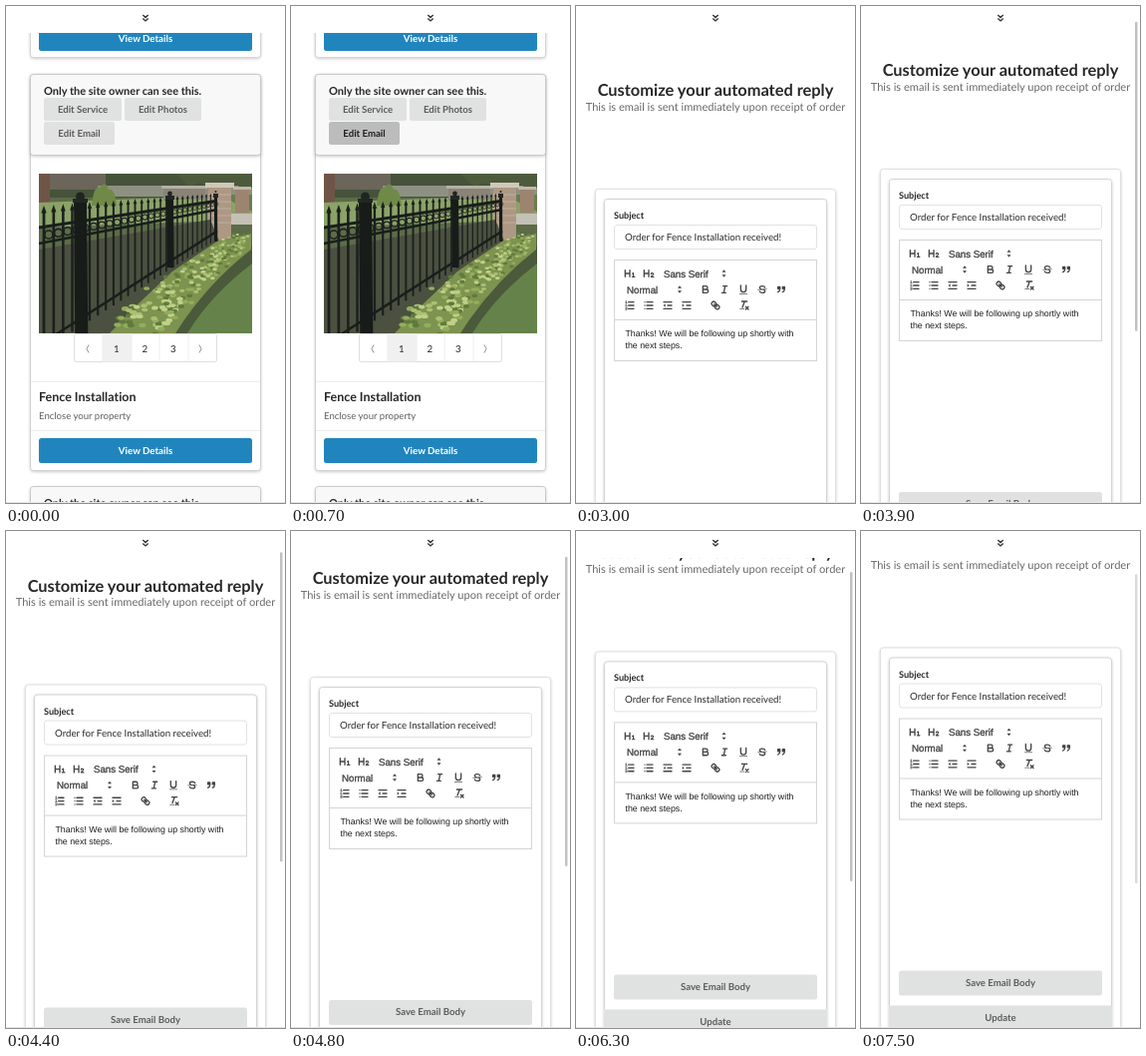
An HTML page for the animation above (8 s loop, 280 px wide and 498 px high).

```html
<!DOCTYPE html>
<html lang="en">
<head>
<meta charset="utf-8">
<title>Email editor walkthrough</title>
<style>
  html, body { margin: 0; height: 100%; overflow: hidden; background: #fff; }
  svg { display: block; width: 280px; height: 498px; }
  text {
    font-family: Lato, sans-serif; white-space: pre;
    text-rendering: geometricPrecision; font-variant-ligatures: none;
  }
  .b { font-weight: 700; }
  .m { text-anchor: middle; }
  .h { font-family: "Liberation Sans", Arial, sans-serif; }
  .pick { stroke: #444; stroke-width: .35; }
  .icon { fill: none; stroke: #444; stroke-width: 2; stroke-linecap: round; stroke-linejoin: round; }
  .icon .f { fill: #444; stroke: none; }
  .icon .t { stroke-width: 1; }
  .icon .n { stroke-width: 1.7; }
  .card { filter: drop-shadow(0 1px 1.5px #0003); }
</style>
</head>
<body>
<svg id="stage" viewBox="0 0 280 498"></svg>
<script>
const rect = (x, y, w, h, fill, r = 0, extra = '') =>
  `<rect x="${x}" y="${y}" width="${w}" height="${h}" rx="${r}" fill="${fill}" ${extra}/>`;
const box = (x, y, w, h, stroke, fill = '#fff', r = 3, extra = '') =>
  rect(x + .5, y + .5, w - 1, h - 1, fill, r, `stroke="${stroke}" ${extra}`);
const text = (s, x, y, size, cls = '', fill = '#272829') =>
  `<text x="${x}" y="${y}" font-size="${size}" class="${cls}" fill="${fill}">${s}</text>`;
const path = (d, stroke, w = 1, fill = 'none') =>
  `<path d="${d}" stroke="${stroke}" stroke-width="${w}" fill="${fill}"/>`;
const shape = (d, fill) => path(d, 'none', 0, fill);
const shadow = 'class="card"';

const BLUE = '#2185bd', GREY = '#e0e1e1', LABEL = '#5c5d5d';

// Photograph, reduced to flat tones
function photo() {
  let s = rect(33, 168, 214, 160, '#5c6b48')
    + rect(33, 168, 214, 24, '#46523a')
    + rect(33, 168, 11, 30, '#6f5546') + rect(44, 168, 56, 16, '#6b655a')
    + rect(92, 180, 155, 11, '#8d9182') + rect(224, 189, 23, 17, '#6b7d50')
    + shape('M33 197L215 190 247 206V214L33 222Z', '#8ba268')
    + shape('M86 200q2-20 8-18 6-8 9 2 6-2 8 16Z', '#6f8a48')
    + shape('M170 168h77v14h-12q-8-8-18 0h-10q-14-9-22 0Z', '#4d5b3c')
    + shape('M225 208h22v11h-22Z', '#c3c1b5')
    + rect(158, 182, 42, 12, '#8a8478') + rect(156, 180, 46, 3, '#b4b0a4')
    + rect(230, 183, 14, 24, '#9d8470') + rect(228, 181, 18, 3, '#c0b9ab')
    + rect(203, 181, 23, 55, '#ad9884')
    + path('M203 189h23m-23 7h23m-23 7h23m-23 7h23m-23 7h23', '#c9b8a6', .7)
    + rect(200, 177, 29, 5, '#cfc8b9')
    + shape('M33 244L205 214 215 238 105 328H33Z', '#4b5040')
    + shape('M150 328Q193 279 247 240V328Z', '#4a5a3a')
    + shape('M182 328Q205 290 247 258V328Z', '#64824a')
    + shape('M104 328L130 301 167 266 213 235 246 228 246 244Q201 279 170 328Z', '#7d9350');
  // Leaf clusters along the planted strip
  let seed = 7;
  const rnd = () => (seed = seed * 16807 % 2147483647) / 2147483647;
  const leaves = ['#a9bf72', '#c0d088', '#5f7a3c', '#94ad5c'];
  for (let i = 0; i < 240; i++) {
    const k = rnd(), x = 130 + 108 * k + (rnd() - .5) * 58 * (1 - k * .65);
    const y = 324 - 91 * Math.pow(k, .85) + (rnd() - .5) * 14, r = 3.6 - 2 * k;
    s += `<ellipse cx="${x.toFixed(1)}" cy="${y.toFixed(1)}" rx="${r}" ry="${r * .6}" fill="${leaves[i % 4]}"/>`;
  }
  // Fence in perspective
  const rail = x => 222 - (x - 33) * .15, foot = x => 348 - (x - 33) * .64;
  const line = (f, w) => path(`M33 ${f(33)}L212 ${f(212)}`, '#191e1b', w);
  for (let x = 38; x < 211; x += 10 - (x - 33) * .034) {
    const k = 1 - (x - 33) / 280, y = rail(x);
    s += path(`M${x} ${y - 17 * k}V${foot(x)}`, '#1b201d', 2.8 * k)
      + shape(`M${x} ${y - 22 * k}l${2.7 * k} ${8 * k}h${-5.4 * k}Z`, '#1b201d')
      + `<circle cx="${x + 5 * k}" cy="${y + 8 * k}" r="${4.2 * k}" fill="none" stroke="#1b201d" stroke-width="${1.6 * k}"/>`;
  }
  s += line(rail, 3) + line(x => rail(x) + 16 - (x - 33) * .04, 2.6) + line(x => foot(x) - 8, 2.5);
  for (const [x, w, y, end] of [[68, 13, 195, 328], [161, 7, 192, 262], [209, 3, 190, 236]])
    s += shape(`M${x} ${y}h${w}l${w * .1} ${end - y}h${-w}Z`, '#171c19')
      + rect(x - 1, y - 2, w + 2, 4, '#222724')
      + `<circle cx="${x + w / 2}" cy="${y - 4}" r="${w * .34}" fill="#202522"/>`;
  return `<g clip-path="url(#photo)">${s}</g>`;
}

const blueButton = y => rect(33, y, 214, 25, BLUE, 2.5)
  + text('View Details', 140, y + 15.7, 9.7, 'b m', '#fff');
const ownerNote = y => box(24, y, 232, 82, '#c9cacb', '#f8f8f8', 3, shadow)
  + text('Only the site owner can see this.', 38, y + 20.5, 11, 'b');

function listing() {
  return box(24, 0, 232, 52, '#d4d4d5', '#fff', 3, shadow) + blueButton(20)
    + box(24, 68, 232, 398, '#d0d1d2', '#fff', 3, shadow) + ownerNote(68)
    + rect(38, 92, 78, 23, GREY, 2.5) + text('Edit Service', 77, 107, 9.6, 'b m', LABEL)
    + rect(119, 92, 77, 23, GREY, 2.5) + text('Edit Photos', 157.5, 107, 9.6, 'b m', LABEL)
    + rect(38, 116, 71, 23, GREY, 2.5, 'id="edit"')
    + `<text id="editLabel" x="73.5" y="131" font-size="9.6" class="b m">Edit Email</text>`
    + photo()
    + box(68, 328, 144, 29, '#dededf', '#fff', 2) + rect(97, 328.5, 29, 28, '#f0f0f0')
    + path('M97 329v27m29-27v27m28-27v27m29-27v27', '#eeeeef')
    + path('M83 339.5l-2 4 2 4m111-8l2 4-2 4', '#777', .8)
    + [1, 2, 3].map(n => text(n, 82.5 + 28.4 * n, 346.5, 9.7, 'm')).join('')
    + path('M25 376.5h230M25 425.5h230', '#ececec')
    + text('Fence Installation', 33, 395.5, 12.5, 'b')
    + text('Enclose your property', 33, 414, 9.6, '', '#5f6061')
    + blueButton(433) + ownerNote(481);
}

// Toolbar glyphs on an 18-unit grid
const heading = '<path d="M2 4V14M9 4V14M2 9H9"/>';
const rows = x => `<path d="M${x} 4H15M${x} 9H15M${x} 14H15"/>`;
const dent = tri => `<path d="M3 4H15M9 9H15M3 14H15"/><path class="f" d="${tri}"/>`;
const sort = '<path class="f" d="M6 11h6l-3 3.6zM6 7h6L9 3.4z"/>';
const icons = [
  [54, 268, heading + '<path class="n" d="M12.8 9.4L14.4 8.4V14M12.6 14h3.800"/>'],
  [73, 268, heading + '<path class="n" d="M12.4 9.8c.5-2 3.700-1.700 3.400.3-.2 1.300-2.600 2.400-3.400 3.900h4"/>'],
  [148.5, 268, sort], [104, 284, sort],
  [130, 284, '<path d="M5 4H9.5a2.5 2.5 0 0 1 0 5H5zM5 9h5.5a2.5 2.5 0 0 1 0 5H5z"/>'],
  [149, 284, '<path d="M7 4H13M5 14H11M8 14L10 4"/>'],
  [168, 284, '<path d="M5 3V9a4 4 0 0 0 8 0V3"/><path class="f" d="M3 15h12v1H3z"/>'],
  [187, 284, '<path class="t" d="M15.5 8.5l-13 1"/><path d="M13 6C12 3.3 5 3.3 5 6.5c0 1.2 1 1.8 2.5 2.2M5 12c1 2.7 8 2.7 8-.5 0-1.2-1-1.8-2.5-2.2"/>'],
  [206, 284, '<path fill="#444" d="M4 5h3v3H4zM11 5h3v3h-3z"/><path d="M7 8c0 4-3 5-3 5M14 8c0 4-3 5-3 5"/>'],
  [54, 300, rows(7) + '<path class="t" d="M2.5 3L3.7 2V5.5M2.5 5.5h2.5M2.5 8h2L2.5 10.5h2.5M2.5 12.5h2.2v3H2.5M3 14h1.5"/>'],
  [73, 300, rows(6) + '<path d="M3 4h0M3 9h0M3 14h0"/>'],
  [92, 300, dent('M5.5 6.5v5L2.5 9z')],
  [111, 300, dent('M2.5 6.5v5L5.5 9z')],
  [140, 300, '<path d="M7 7l4 4"/><path d="M8.9 4.6a3.5 3.5 0 0 1 .4 4.7 3.5 3.5 0 0 1-4.7-.4C3.2 7.5 2 6.4 4.2 4.2S7.5 3.2 8.9 4.6zM13.4 9.1a3.5 3.5 0 0 0-4.7-.4 3.5 3.5 0 0 0 .4 4.7c1.4 1.4 2.5 2.5 4.7.4s1-3.3-.4-4.7z"/>'],
  [169, 300, '<path d="M5 3H13M6 12L9.35 3M11 11l4 4M15 11l-4 4"/><path class="f" d="M2 14h7v1H2z"/>'],
];

function editor() {
  return text('Customize your automated reply', 140, 90, 16.4, 'b m')
    + text('This is email is sent immediately upon receipt of order', 140, 104.7, 11.1, 'm', '#68696a')
    + box(19, 183, 242, 440, '#e0e0e1', '#fff', 3, shadow)
    + box(28, 193, 224, 420, '#d4d4d5', '#fff', 3, shadow)
    + text('Subject', 38, 213, 9.1, 'b')
    + box(38, 219, 204, 25, '#e2e2e3', '#fff', 2.5)
    + text('Order for Fence Installation received!', 49, 235, 9.7)
    + box(38, 254, 204, 102, '#d4d4d4', '#fff', 0) + path('M38 314.5h204', '#d4d4d4')
    + text('Sans Serif', 88, 271.5, 9.7, 'h pick', '#444')
    + text('Normal', 51, 287.5, 9.7, 'h pick', '#444')
    + icons.map(([x, y, art]) => `<g class="icon" transform="translate(${x - 6} ${y - 6}) scale(.667)">${art}</g>`).join('')
    + text('Thanks! We will be following up shortly with', 49.5, 331.3, 8.8, 'h', '#1c1c1c')
    + text('the next steps.', 49.5, 343.3, 8.8, 'h', '#1c1c1c')
    + rect(38, 507, 204, 25, GREY, 2.5) + text('Save Email Body', 140, 522.3, 9.6, 'b m', LABEL)
    + rect(28, 542, 224, 25, GREY) + text('Update', 140, 557.3, 9.6, 'b m', LABEL);
}

const $ = id => document.getElementById(id);
$('stage').innerHTML = `<defs><clipPath id="photo"><rect x="33" y="168" width="214" height="160"/></clipPath></defs>
  <g id="listing">${listing()}</g><g id="editor">${editor()}</g>
  ${rect(0, 0, 280, 27, '#fff')}
  ${path('M137.3 9l2.7 2.5 2.7-2.5m-5.4 3.4l2.7 2.5 2.7-2.5', '#333', 1.4)}
  ${rect(275, 4, 2.5, 310, '#c1c1c1', 1.2, 'id="bar"')}
  ${rect(0, 497, 280, 1, '#e6e6e6')}`;

// Piecewise linear value through [time, value] points
function track(points, t) {
  const i = points.findIndex(p => p[0] > t);
  if (i < 0) return points[points.length - 1][1];
  if (!i) return points[0][1];
  const [t0, a] = points[i - 1], [t1, b] = points[i];
  return a + (b - a) * (t - t0) / (t1 - t0);
}
const scroll = [[3100, 0], [3900, 20], [4800, 37], [5600, 53.5], [6600, 66.5]];
const press = [[100, 0], [600, 1]];
const barFade = [[1900, 1], [2000, .7], [2400, .4], [2900, .3], [3000, 0], [3100, 0], [3200, 1], [7400, 1], [7500, .6]];

function draw(now) {
  const t = Math.floor(now % 8000 / 100) * 100, second = t >= 1000;
  const y = track(scroll, t), p = track(press, t);
  const grey = (a, b) => `rgb(${Array(3).fill(Math.round(a + (b - a) * p))})`;
  $('listing').style.display = second ? 'none' : '';
  $('editor').style.display = second ? '' : 'none';
  $('editor').setAttribute('transform', `translate(0 ${-y})`);
  $('edit').setAttribute('fill', grey(225, 188));
  $('editLabel').setAttribute('fill', grey(92, 30));
  $('bar').setAttribute('y', 4 + y * .59);
  $('bar').setAttribute('opacity', second ? track(barFade, t) : 0);
}
const start = performance.now();
(function loop() {
  draw(performance.now() - start);
  requestAnimationFrame(loop);
})();
</script>
</body>
</html>
```
